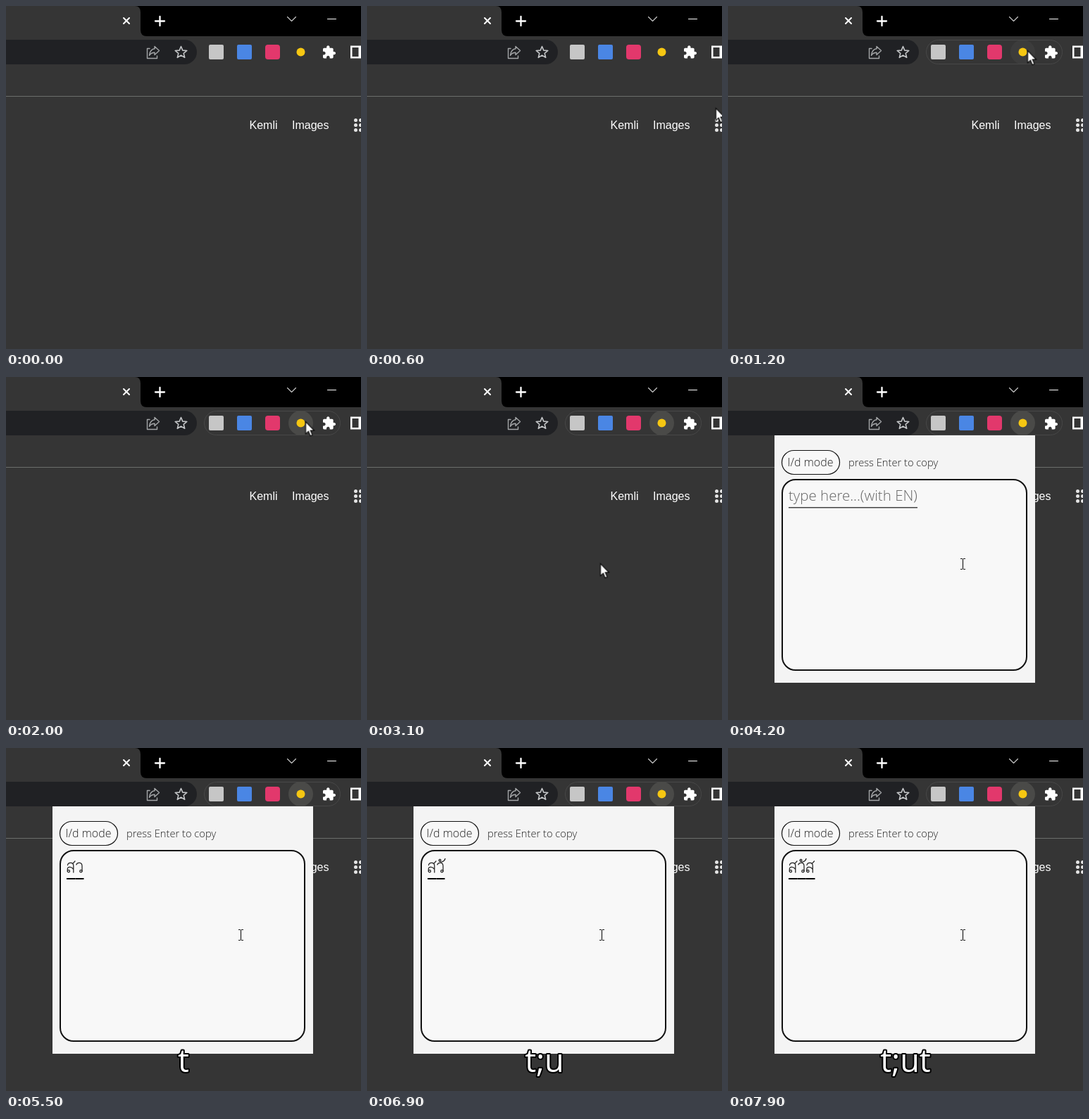
An HTML page for the animation above (8000 ms loop, 504 by 488 pixels).

```html
<!DOCTYPE html>
<html lang="en">
<head>
<meta charset="utf-8">
<title>Typing popup</title>
<style>
  html, body { margin: 0; width: 100%; height: 100%; overflow: hidden; background: #353535; }
  svg { display: block; width: 504px; height: 488px; }

  .link { font: 16px "Liberation Sans", Arial, sans-serif; fill: #fff; }
  .ui { font-family: "Open Sans", "Noto Sans", sans-serif; font-weight: 300; fill: #222; }
  .caption {
    font: 45px "Open Sans", "Noto Sans", sans-serif; text-anchor: middle;
    fill: #fff; stroke: #000; stroke-width: 4; stroke-linejoin: round; paint-order: stroke;
  }
  .line { fill: none; stroke-linecap: round; stroke-linejoin: round; }
  .thai { fill: none; stroke: #222; stroke-width: 1.25; stroke-linecap: round; stroke-linejoin: round; }

  /* every part shares one 8 s clock */
  .step { animation: 8s step-end infinite; }
  .fade { animation: 8s linear infinite; }

  .pill { animation-name: pill; }
  .halo { animation-name: halo; }
  .popup { animation-name: popup; }
  .hint { opacity: 0; animation-name: hint; }
  .k1 { animation-name: k1; }
  .k2 { animation-name: k2; }
  .k3 { animation-name: k3; }
  .k4 { animation-name: k4; }
  .c1 { opacity: 0; animation-name: c1; }
  .c2 { opacity: 0; animation-name: c2; }
  .c3 { opacity: 0; animation-name: c3; }
  .c4 { animation-name: c4; }
  .pointer { opacity: 0; animation: move 8s linear infinite, leave 8s step-end infinite; }

  @keyframes pill { 0%, 12.5% { opacity: 0 } 14.5%, 100% { opacity: 1 } }
  @keyframes halo { 0%, 13.75% { opacity: 0 } 17%, 100% { opacity: 1 } }
  @keyframes popup { 0% { opacity: 0 } 42.5% { opacity: 1 } }
  @keyframes hint { 0% { opacity: 1 } 62.5% { opacity: 0 } }
  @keyframes k1 { 0% { opacity: 0 } 62.5% { opacity: 1 } }
  @keyframes k2 { 0% { opacity: 0 } 67.5% { opacity: 1 } }
  @keyframes k3 { 0% { opacity: 0 } 77.5% { opacity: 1 } }
  @keyframes k4 { 0% { opacity: 0 } 88.75% { opacity: 1 } }
  @keyframes c1 { 0% { opacity: 0 } 66.25% { opacity: 1 } 72.5% { opacity: 0 } }
  @keyframes c2 { 0% { opacity: 0 } 72.5% { opacity: 1 } 81.25% { opacity: 0 } }
  @keyframes c3 { 0% { opacity: 0 } 81.25% { opacity: 1 } 92.5% { opacity: 0 } }
  @keyframes c4 { 0% { opacity: 0 } 92.5% { opacity: 1 } }
  @keyframes leave { 0% { opacity: 1 } 42.5% { opacity: 0 } }
  @keyframes move {
    0%, 1.25% { transform: translate(506px, 260px) }
    11.25% { transform: translate(489px, 77px); animation-timing-function: ease-out }
    15%, 25% { transform: translate(425.5px, 63.5px); animation-timing-function: ease-in-out }
    33.75% { transform: translate(347px, 247px); animation-timing-function: ease-out }
    38.75%, 100% { transform: translate(331.5px, 265.5px) }
  }
</style>
</head>
<body>
<svg viewBox="0 0 504 488">
  <defs>
    <g id="so-suea">
      <path d="M1.5-10.3C2-14.6 9.8-15.2 9.8-9.3V0M1.3-1.8V-4.8C1.3-8.8 7.2-8.3 9.8-4.4M8.7-12.3L12-16"/>
      <circle cx="2.9" cy="-1.7" r="1.6"/>
    </g>
    <g id="wo-waen">
      <path d="M1.4-11C2.6-14.6 9.5-15 9.5-9V-1.8"/>
      <circle cx="7.9" cy="-1.8" r="1.6"/>
    </g>
  </defs>

  <!-- window frame -->
  <rect width="504" height="488" fill="#353535"/>
  <rect width="504" height="43" fill="#000"/>
  <path d="M0 0H183Q191 0 191 9V34Q191 43 200 43H0Z" fill="#353535"/>
  <g class="line" stroke="#fff">
    <path d="M167 17L175 25M175 17L167 25" stroke-width="2"/>
    <path d="M212 21.5H225M218.5 15V28" stroke-width="2.3"/>
    <path d="M399.5 15.5L405.5 21.5L411.5 15.5" stroke="#ccc" stroke-width="1.1"/>
    <path d="M456.500 18.500H468.500" stroke-width="1.1"/>
  </g>

  <!-- address bar -->
  <path d="M0 48H253.500A17.500 17.500 0 0 1 253.500 83H0Z" fill="#202124"/>
  <g class="line" stroke="#a4a6a8" stroke-width="1.4">
    <path d="M204 60.500H200.500V74.500H214.500V71"/>
    <path d="M211 57.500L217.500 63.500L211 69.500V66.300C207.500 66.300 205.300 67.500 203.500 70.300C204 65 206.500 61.300 211 60.700Z"/>
    <path d="M248.500 57.500L250.800 63.100L256.800 63.500L252.200 67.400L253.700 73.300L248.500 70.100L243.300 73.300L244.800 67.400L240.200 63.500L246.200 63.100Z" stroke="#c4c6c8" stroke-width="1.6"/>
  </g>

  <!-- extension buttons -->
  <rect class="fade pill" x="281.500" y="48.500" width="193" height="34" rx="17" fill="none" stroke="#484848"/>
  <circle class="fade halo" cx="418.500" cy="65.500" r="17.500" fill="#4a4a48"/>
  <rect x="288" y="55" width="21" height="21" rx="2" fill="#c6c6c6"/>
  <rect x="328" y="55" width="21" height="21" rx="2" fill="#4a86e4"/>
  <rect x="368" y="55" width="21" height="21" rx="4" fill="#e2386c"/>
  <circle cx="418.500" cy="65.500" r="6" fill="#f6c712"/>
  <path transform="translate(448.300 55.500) scale(.86)" fill="#fff" d="M20.500 11H19V7c0-1.100-.900-2-2-2h-4V3.500C13 2.120 11.880 1 10.500 1S8 2.120 8 3.500V5H4c-1.100 0-2 .900-2 2v3.800H3.500c1.490 0 2.700 1.210 2.700 2.700s-1.210 2.700-2.700 2.700H2V20c0 1.100.900 2 2 2h3.800v-1.500c0-1.490 1.210-2.700 2.700-2.700s2.700 1.210 2.700 2.700V22H17c1.100 0 2-.900 2-2v-4h1.500c1.380 0 2.500-1.120 2.500-2.500S21.880 11 20.500 11z"/>
  <path d="M489 56.500H506V74.500H489ZM491.500 59V72H500.500V59Z" fill="#fff" fill-rule="evenodd"/>

  <!-- page -->
  <rect y="128" width="504" height="1" fill="#6c6e6c"/>
  <text class="link" x="345.500" y="175">Kemli</text>
  <text class="link" x="406" y="175">Images</text>
  <path d="M496.500 162.500h0M496.500 169.500h0M496.500 176.500h0M503.500 162.500h0M503.500 169.500h0M503.500 176.500h0" stroke="#e4e4e4" stroke-width="5" stroke-linecap="round"/>

  <!-- popup -->
  <g class="step popup">
    <rect x="66" y="83" width="370" height="352" fill="#f4f4f4"/>
    <rect x="76.500" y="104.500" width="82" height="34" rx="17" fill="#f8f8f8" stroke="#111" stroke-width="1.200"/>
    <text class="ui" x="84.500" y="127" font-size="16">I/d mode</text>
    <text class="ui" x="171" y="127" font-size="14.700">press Enter to copy</text>
    <rect x="77" y="146" width="347" height="271" rx="19" fill="#f8f8f8" stroke="#111" stroke-width="2"/>

    <g class="step hint">
      <text class="ui" x="86" y="176" font-size="20.500" style="fill:#666">type here...(with EN)</text>
      <rect x="86" y="185" width="183" height="1.500" fill="#444"/>
    </g>

    <g class="thai" role="img" aria-label="สวัส">
      <g class="step k1">
        <use href="#so-suea" x="86" y="177"/>
        <path d="M86 186H98.500" stroke="#000" stroke-width="2" stroke-linecap="butt"/>
      </g>
      <g class="step k2">
        <use href="#wo-waen" x="98.500" y="177"/>
        <path d="M98.500 186H110.500" stroke="#000" stroke-width="2" stroke-linecap="butt"/>
      </g>
      <g class="step k3">
        <circle cx="103.500" cy="159.800" r="1.400"/>
        <path d="M102.300 160.500C104 163 109.500 162.500 111 157.500"/>
      </g>
      <g class="step k4">
        <use href="#so-suea" x="110.500" y="177"/>
        <path d="M110.500 186H123.500" stroke="#000" stroke-width="2" stroke-linecap="butt"/>
      </g>
    </g>

    <path d="M330 258.500H333M334 258.500H337M333.500 259V273M330 273.500H333M334 273.500H337" stroke="#111" stroke-width="1.100"/>
  </g>

  <!-- pressed keys -->
  <g class="caption">
    <text class="step c1" x="252" y="461">t</text>
    <text class="step c2" x="252" y="461">t;</text>
    <text class="step c3" x="252" y="461">t;u</text>
    <text class="step c4" x="252" y="461">t;ut</text>
  </g>

  <g class="pointer">
    <path d="M0 0V17.300L3.900 13.700L6.600 20.200L9.500 19L6.800 12.500H12Z" fill="#fff" stroke="#000" stroke-width="1.100"/>
  </g>
</svg>
</body>
</html>
```
